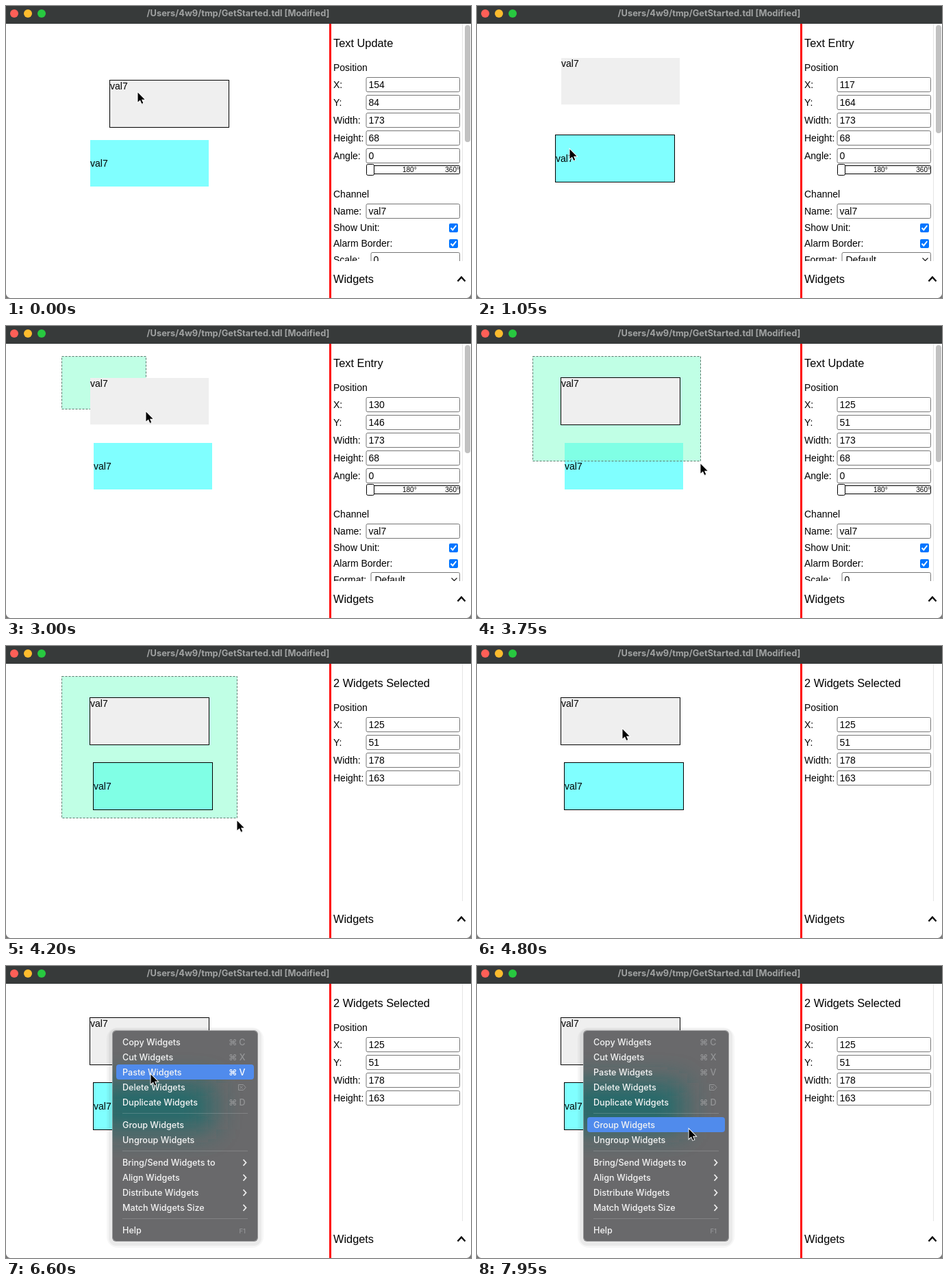
Write an HTML page that moves like this. It is 679x427 px and loops after 8000 ms.

```html
<!DOCTYPE html>
<html>
<head>
<meta charset="utf-8">
<style>
html, body { margin: 0; width: 100%; height: 100%; overflow: hidden; background: #fff; }
svg { display: block; width: 679px; height: 427px; font: 14px "Liberation Sans", Arial, sans-serif; }
.menu { font: 500 12.6px Inter, sans-serif; }
.head { font-size: 16.35px; }
.title { font: 700 12.85px Inter, sans-serif; }
.box { fill: #fff; stroke: #767676; }
.outline { fill: #fff; stroke: #000; }
.line { fill: none; }
</style>
</head>
<body>
<svg id="stage" viewBox="0 0 679 427">
  <defs>
    <clipPath id="panelClip"><rect x="475" y="26" width="204" height="347"/></clipPath>
    <clipPath id="menuClip"><rect x="155" y="94" width="213" height="309" rx="6"/></clipPath>
    <filter id="blur" x="-50%" y="-120%" width="200%" height="340%"><feGaussianBlur stdDeviation="20"/></filter>
  </defs>
  <rect width="679" height="427" fill="#fff"/>
  <g id="canvas"></g>
  <rect x="472" y="25" width="3" height="402" fill="#f00"/>
  <g id="panel"></g>
  <g id="bar"></g>
  <g id="menu" class="menu"></g>
  <g id="cursor">
    <path d="M0 1V16L3.6 13 6 18.4 8.4 17.4 6 12H11Z" opacity=".18"/>
    <path d="M.5 .5V14.6L3.9 11.5 6.2 16.8 8.3 15.9 6 10.8H10.6Z"
      stroke="#fff" stroke-width="1.8" paint-order="stroke"/>
  </g>
</svg>
<script>
const LOOP = 8000, STEP = 150, W = 173, H = 68;
const $ = id => document.getElementById(id);

function add(parent, tag, attrs, text) {
  const el = document.createElementNS("http://www.w3.org/2000/svg", tag);
  set(el, attrs);
  if (text !== undefined) el.textContent = text;
  parent.appendChild(el);
  return el;
}
function set(el, attrs) { for (const k in attrs) el.setAttribute(k, attrs[k]); }
const show = (el, on) => el.setAttribute("visibility", on ? "inherit" : "hidden");
const place = (el, p) => el.setAttribute("transform", `translate(${p})`);
const group = (parent, attrs) => add(parent, "g", attrs);
const label = (g, x, y, s, attrs) => add(g, "text", { x, y, ...attrs }, s);
const box = (g, x, y, w, h, attrs) => add(g, "rect", { x, y, width: w, height: h, ...attrs });
const line = (g, d, stroke, width) => add(g, "path", { d, class: "line", stroke, "stroke-width": width });

// Title bar
const bar = $("bar");
box(bar, 0, 0, 679, 26, { fill: "#373a3a" });
["#fe5f57", "#febc2e", "#28c840"].forEach((fill, i) =>
  add(bar, "circle", { cx: 12 + 20 * i, cy: 11, r: 6, fill }));
label(bar, 339, 15, "/Users/4w9/tmp/GetStarted.tdl [Modified]", {
  class: "title", "text-anchor": "middle", fill: "#a0a2a2"
});
add(bar, "path", { d: "M0 421V427H6Q1 426 0 421ZM679 421V427H673Q678 426 679 421Z", fill: "#777" });

// Widgets on the canvas
const canvas = $("canvas");
function widget(fill, textY) {
  const g = group(canvas);
  box(g, 0, 0, W, H, { fill });
  const frame = box(g, -.5, -.5, W + 1, H + 1, { class: "line", stroke: "#000" });
  label(g, 0, textY, "val7");
  return { g, frame };
}
const cyan = widget("#80ffff", 39);
const band = add(canvas, "rect", {
  fill: "#c0ffe5", stroke: "#5a7a6d", "stroke-dasharray": "3 2", style: "mix-blend-mode:darken"
});
const gray = widget("#efefef", 13);

// Property panel
const panel = group($("panel"), { "clip-path": "url(#panelClip)" });
box(panel, 666, 26, 1, 347, { fill: "#e4e4e4" });
const title = label(panel, 478, 60, "", { class: "head" });
label(panel, 478, 95, "Position");

function field(g, name, y, value, x = 526) {
  label(g, 478, y + 5, name);
  box(g, x, y - 10.5, 662.5 - x, 21, { rx: 2, class: "box" });
  return label(g, x + 3.5, y + 5, value);
}
const values = ["X:", "Y:", "Width:", "Height:"].map((s, i) => field(panel, s, 115 + 26 * i, ""));

const details = group(panel);
field(details, "Angle:", 219, "0");
box(details, 526.5, 233.5, 136, 12, { rx: 1, class: "outline" });
label(details, 579, 242.5, "180°", { "font-size": 10 });
label(details, 662, 242.5, "360°", { "font-size": 10, "text-anchor": "end" });
box(details, 526.5, 231.5, 11, 16, { rx: 2, class: "outline" });
label(details, 478, 280, "Channel");
field(details, "Name:", 300, "val7");
["Show Unit:", "Alarm Border:"].forEach((s, i) => {
  const y = 324 + 23 * i;
  label(details, 478, y + 5, s);
  box(details, 647, y - 6, 13, 13, { rx: 2, fill: "#0075ff" });
  line(details, `M649.5 ${y + .5}l2.8 2.9 5-6.4`, "#fff", 2);
});
const scale = group(details), format = group(details);
field(scale, "Scale:", 371, "0", 533);
field(format, "Format:", 371, "Default", 533).setAttribute("dx", 2);
line(format, "M650.5 368.5l4 4 4-4", "#222", 1.3);
const thumb = box(details, 670, 28, 8, 171, { rx: 4, fill: "#c1c1c1" });

label($("panel"), 478, 405, "Widgets", { class: "head" });
line($("panel"), "M659.5 402.5l5.5-6 5.5 6", "#000", 2.4);

// Context menu: cyan shows through as a blurred teal
const menu = $("menu");
box(menu, 147, 90, 229, 322, { rx: 16, fill: "#000", opacity: .035 });
box(menu, 150, 92, 223, 317, { rx: 11, fill: "#000", opacity: .05 });
const glass = group(menu, { "clip-path": "url(#menuClip)" });
box(glass, 155, 94, 213, 309, { fill: "#69696b" });
box(glass, 128, 171, W, H, { fill: "#206a6b", filter: "url(#blur)" });
box(menu, 155.5, 94.5, 212, 308, { rx: 6, class: "line", stroke: "#fff", "stroke-opacity": .3 });
const glow = box(menu, 161, 0, 201, 22, { rx: 4, fill: "#508bec" });

function hintFor(key, y) {
  const hint = group(menu);
  const end = { "text-anchor": "end" };
  if (key === ">") line(hint, `M346.5 ${y - 4}l4 4.5-4 4.5`, "#eee", 1.8);
  else if (key === "del")
    line(hint, `M339.5 ${y - 3.5}h7l3.5 4-3.5 4h-7zM341.5 ${y - 1.5}l4 4m0-4l-4 4`, "#949597", 1);
  else if (key === "F1") label(hint, 350, y + 5, key, { ...end, "font-size": 9.5 });
  else if (key) {
    label(hint, 325, y + 5, "⌘");
    label(hint, 349.5, y + 5, key, end);
  }
  return hint;
}
const sections = [
  "Copy Widgets|C,Cut Widgets|X,Paste Widgets|V,Delete Widgets|del,Duplicate Widgets|D",
  "Group Widgets,Ungroup Widgets",
  "Bring/Send Widgets to|>,Align Widgets|>,Distribute Widgets|>,Match Widgets Size|>",
  "Help|F1"
];
const rows = [];
let rowY = 111;
sections.forEach((section, i) => {
  if (i) {
    box(menu, 170, rowY - 6, 183, 1, { fill: "#fff", opacity: .17 });
    rowY += 11;
  }
  section.split(",").forEach(item => {
    const [name, key] = item.split("|");
    label(menu, 170, rowY + 5, name, { fill: "#f4f4f4" });
    rows.push({ y: rowY, hint: hintFor(key, rowY) });
    rowY += 22;
  });
});

// The pointer glides between a few stops; everything it drags follows it
const stops = [
  [0, 192, 126], [450, 163, 93],                        // drag gray
  [750, 143, 216], [1050, 135, 209], [1650, 148, 191],  // drag cyan
  [1800, 148, 191], [2250, 81, 48],
  [3750, 326, 201], [4200, 337, 255],                   // stretch the band
  [4800, 212, 121], [5700, 155, 98], [6000, 155, 98],   // open the menu
  [6600, 211, 158], [7050, 204, 229], [7950, 309, 238]  // browse it
];
function pointer(t) {
  const i = Math.max(1, stops.findIndex(s => s[0] >= t));
  const [t0, x0, y0] = stops[i - 1], [t1, x1, y1] = stops[i];
  const k = (t - t0) / (t1 - t0);
  return [Math.round(x0 + (x1 - x0) * k), Math.round(y0 + (y1 - y0) * k)];
}
function dragged(t, from, to, dx, dy) {
  const [x, y] = pointer(Math.min(to, Math.max(from, t)));
  return [x - dx, y - dy];
}

function draw(time) {
  const t = Math.floor(time / STEP) * STEP;
  const p = pointer(t);
  const g = dragged(t, 0, 450, 40, 17);
  const c = dragged(t, 750, 1650, 20, 20);
  const b = dragged(t, 2250, 4200, 0, 4);
  const enclosed = w => t > 2250 && b[0] > w[0] + W && b[1] > w[1] + H;
  const grayOn = t < 750 || enclosed(g);
  const cyanOn = (t >= 750 && t < 2250) || enclosed(c);
  const both = grayOn && cyanOn, entry = t >= 750 && !grayOn;

  place(gray.g, g);
  // cyan rests above its grab point until picked up
  place(cyan.g, c);
  show(gray.frame, grayOn);
  show(cyan.frame, cyanOn);
  show(band, t >= 2250 && t < 4350);
  set(band, { x: 81.5, y: 44.5, width: b[0] - 81, height: b[1] - 44 });

  title.textContent = both ? "2 Widgets Selected" : entry ? "Text Entry" : "Text Update";
  const [x, y] = entry ? c : g;
  const size = both ? [c[0] + W - g[0], c[1] + H - g[1]] : [W, H];
  [x + 2, y - 25, ...size].forEach((v, i) => { values[i].textContent = v; });
  show(details, !both);
  show(scale, !entry);
  show(format, entry);
  thumb.setAttribute("height", entry ? 158 : 171);

  show(menu, t >= 5700);
  const hot = t > 6000 && rows.find(r => Math.abs(p[1] - r.y) <= 11);
  show(glow, hot);
  if (hot) glow.setAttribute("y", hot.y - 11);
  rows.forEach(r => r.hint.setAttribute("fill", r === hot ? "#fff" : "#949597"));
  place($("cursor"), p);
}

function tick() {
  draw(performance.now() % LOOP);
  requestAnimationFrame(tick);
}
tick();
</script>
</body>
</html>
```
